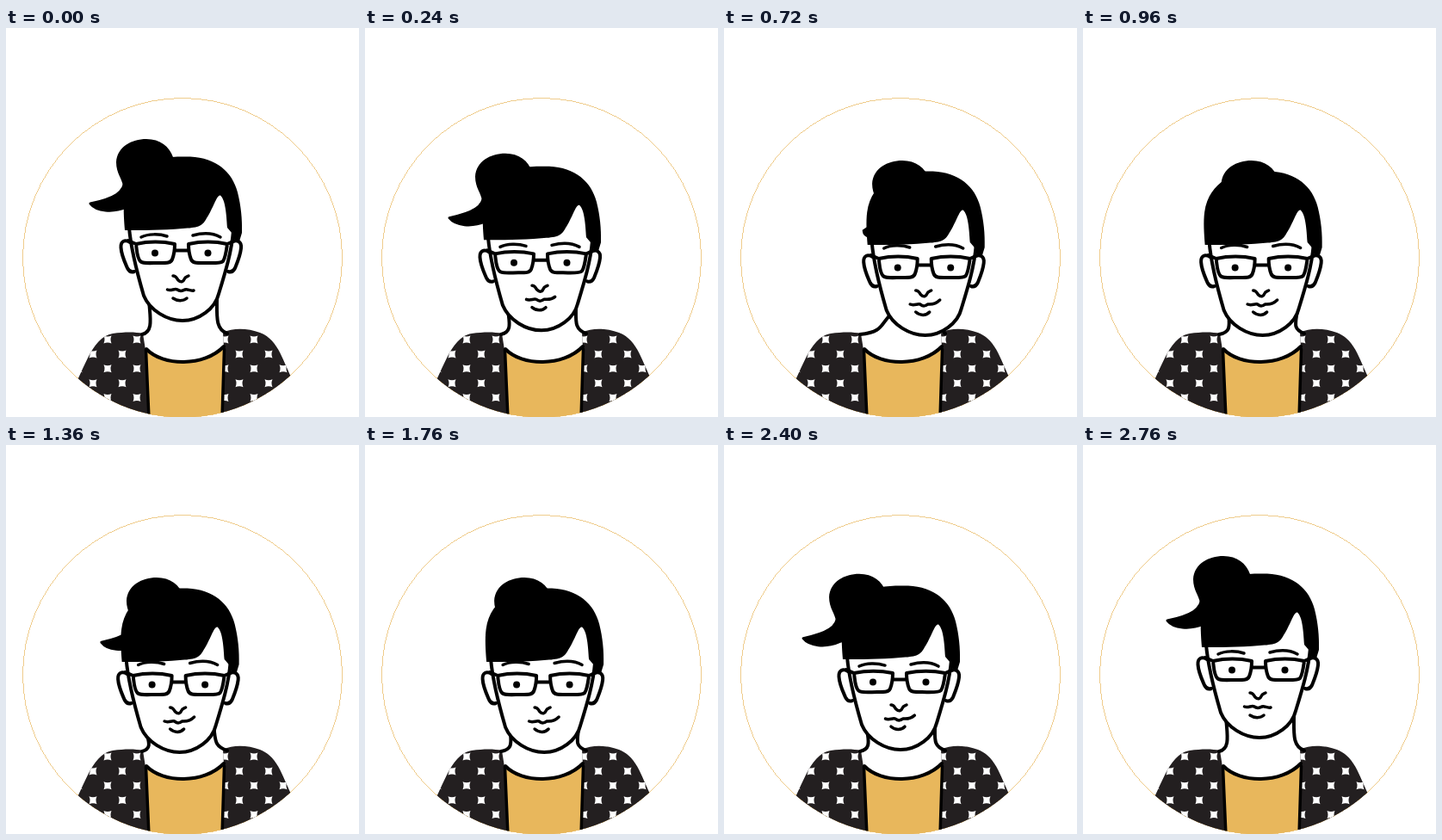
An HTML page for the animation above (3.28 s loop, 410 by 452 pixels).

```html
<!DOCTYPE html>
<html lang="en">
<head>
<meta charset="utf-8">
<title>Portrait</title>
<style>
html, body { margin: 0; width: 100%; height: 100%; overflow: hidden; background: #fff; }
svg { display: block; width: 100%; height: 100%; }
.line { fill: none; stroke: #000; stroke-width: 4; stroke-linecap: round; stroke-linejoin: round; }
.thin { stroke-width: 3.5; }
.skin { fill: #fff; }
</style>
</head>
<body>
<svg viewBox="0 0 410 452" xmlns="http://www.w3.org/2000/svg">
  <defs>
    <clipPath id="disc"><circle cx="205" cy="267" r="185.5"/></clipPath>
    <path id="coat" d="M72 430C90 402 98 359 124 355C138 353 150 353 159 355L162 374L166 452H70ZM252 354C264 348 281 349 295 354C318 363 321 388 336 415V452H251L253 372Z"/>
    <clipPath id="cloth"><use href="#coat"/></clipPath>
  </defs>
  <circle cx="205" cy="267" r="185.5" fill="none" stroke="#e8b75c" stroke-width=".7" shape-rendering="crispEdges"/>
  <g clip-path="url(#disc)">
    <path fill="#e8b75c" d="M162 373C182 393 230 394 254 370L251 456H166Z"/>
    <use href="#coat" fill="#231f20"/>
    <path id="stars" fill="#fff" clip-path="url(#cloth)"/>
    <path class="line thin" d="M162.500 374L166 454M253.500 373L251 454"/>
  </g>
  <path id="neck" class="line skin"/>
  <path class="line" d="M163 373C182 393 230 394 253 370"/>
  <g id="bun">
    <path d="M136 184C135 175 128 169 128 156C129 138 146 129 163 129C179 129 190 138 194 150L200 180L160 205L136 200Z"/>
    <path id="tail" stroke="#000" stroke-width="3" stroke-linejoin="round"/>
  </g>
  <g id="head">
    <path class="line skin" d="M144 249C138 245 133 248 133.500 255C134 264 138 272 141 279C143 283 146 284 149 283M262 249C268 245 274 248 273 256C272 265 268 274 266 279C264 283 261 284 258 283"/>
    <path class="line skin" d="M143 232C145 256 153 287 160 311C167 328 187 340 205 340C224 340 243 326 247 309C255 283 262 260 264 236"/>
    <path id="brows" class="line thin" d="M157 243C165 239 178 239 187 242M217 241C228 238 240 238 249 243"/>
    <path d="M138 235C137 222 136 208 137.500 197C140 178 150 167 160 160C174 150 192 149 214 149.500C244 151 263 167 269 191C273 207 274.500 222 274 238L271 248L264 245L263 239L257 232C256 217 255 200 249 194.500C245 193 241 209 233 221C228 231 222 232 205 233C180 235 160 235 138 235Z"/>
    <path class="line" d="M151 251C165 248 182 248 196 251C196 259 195 264 193 269C191 273 188 273 178 273C168 273 159 274 156 271C152 267 152 258 151 251ZM212 251C226 248 243 248 257 251C256 258 255 267 252 271C249 274 239 273 230 273C220 273 217 273 215 269C213 264 212 259 212 251ZM196 258.500H212M151 251L142 247M257 251L266 247"/>
    <circle cx="173" cy="261.500" r="4"/>
    <circle cx="234.500" cy="261.500" r="4"/>
    <path class="line thin" d="M194 288C198 288 198 291 200 293C203 296 206 295 207 292C208 289 210 289 212 288"/>
    <path id="mouth" class="line thin"/>
  </g>
</svg>
<script>
const LOOP = 3280, STEP = 40, LAST = 2760;
const $ = id => document.getElementById(id);

let stars = "";
for (let row = 0; row < 5; row++)
  for (let col = row % 2; col < 15; col += 2)
    stars += `M${79.5 + 17 * col} ${357.5 + 16.9 * row}q4.5 2 9 0q-2 4.5 0 9q-4.5 -2 -9 0q2 -4.5 0 -9Z`;
$("stars").setAttribute("d", stars);

const smooth = u => u * u * (3 - 2 * u);

// cubic-bezier(.45, 0, .55, 1)
function swing(u) {
  let lo = 0, hi = 1;
  for (let i = 0; i < 24; i++) {
    const s = (lo + hi) / 2, r = 1 - s;
    if (1.35 * s * r * r + 1.65 * s * s * r + s * s * s < u) lo = s; else hi = s;
  }
  return smooth(lo);
}

const ramp = (t, from, to, ease = smooth) =>
  ease(Math.min(1, Math.max(0, (t - from) / (to - from))));
const mix = (a, b, u) => a + (b - a) * u;

// The head leans right, left, right, left, one lean per beat, then centres.
const START = 375, BEAT = 399, CENTRE = 2240;
const beat = n => START + BEAT * n;

function lean(t) {
  let x = ramp(t, beat(0), beat(1), swing);
  for (let n = 1; n < 4; n++) x += (n % 2 ? -2 : 2) * ramp(t, beat(n), beat(n + 1), swing);
  return 29.7 * (x + ramp(t, beat(4), CENTRE));
}

// The bun trails the head to the right, then catches up.
const trail = t => 29 * ramp(t, 460, 960) - 14 * ramp(t, 960, 1400) + 4 * ramp(t, 1360, 1760)
  - 27 * ramp(t, 1760, 2180) + 8 * ramp(t, CENTRE, 2720);

// 0: lock of hair flicked out, 1: hanging down
const hang = t => ramp(t, 460, 860) - ramp(t, 1120, 1390)
  + ramp(t, 1390, 1660) - ramp(t, 2060, CENTRE);

function draw(t) {
  const dip = ramp(t, 5, 400, swing) - ramp(t, 2250, 2755, swing);
  const dx = lean(t), dy = 17 * dip, h = hang(t);
  const move = (id, x, y) => $(id).setAttribute("transform", `translate(${x} ${y})`);
  const shape = (id, d) => $(id).setAttribute("d", d);

  move("head", dx, dy);
  move("bun", dx + trail(t), 25 * dip);
  move("brows", 0, 4.5 * (ramp(t, beat(4), CENTRE) - ramp(t, 480, 780)));

  const hair = (x0, y0, x1, y1) => `${mix(x0, x1, h)} ${mix(y0, y1, h)} `;
  shape("tail", "M138 176C" + hair(138, 191, 140, 192) + hair(126, 198, 134, 204) +
    hair(98, 204, 126, 213) + "C" + hair(105, 213, 124, 220) + hair(124, 215, 129, 222) +
    hair(140, 208, 142, 216) + "L160 202L152 178Z");

  shape("neck",
    `M158 356C${172 + dx / 2} 353 ${167 + dx / 2} ${335 + dy / 2} ${166 + dx} ${315 + dy}` +
    `L${245 + dx} ${313 + dy}C${245 + dx / 2} ${335 + dy / 2} ${243 + dx / 5} 350 257 355`);

  const lip = (a, b) => mix(a, b, dip);
  shape("mouth",
    `M187.500 304C192 306 196 ${lip(302, 303)} 199 304C203 307 205 ${lip(305, 306)} 208 304` +
    `C211 ${lip(303, 304)} ${lip(214, 216)} ${lip(306, 305)} ${lip(218, 222)} ${lip(305, 299)}` +
    `M194 ${lip(314, 313)}C199 317.500 206 317.500 210 ${lip(314, 313)}`);
}

const start = performance.now();
function tick() {
  const t = (performance.now() - start) % LOOP;
  draw(Math.min(LAST, Math.floor(t / STEP) * STEP));
  requestAnimationFrame(tick);
}
tick();
</script>
</body>
</html>
```
